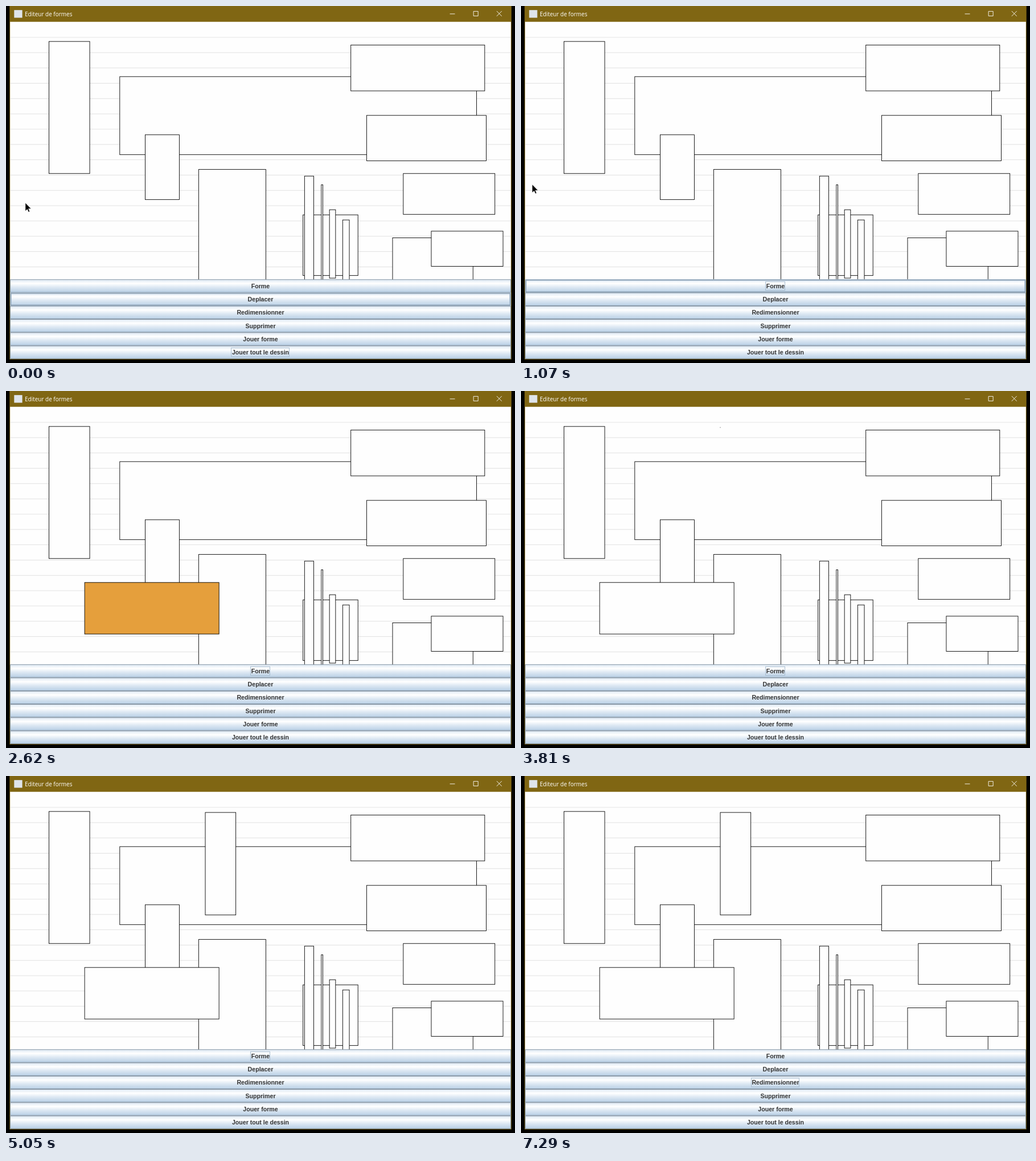
Write an HTML page that moves like this. It is 894 px wide and 626 px high and loops after 7990 ms.

```html
<!DOCTYPE html>
<html lang="fr">
<head>
<meta charset="utf-8">
<title>Editeur de formes</title>
<style>
  html, body { margin: 0; width: 100%; height: 100%; overflow: hidden; background: #000; }
  svg { display: block; }
  .shape { fill: #fefefe; stroke: #000; }
  .label { font: bold 11.88px "Liberation Sans", Arial, sans-serif; fill: #333; text-anchor: middle; }
  .title { font: 11.15px "Open Sans", "Noto Sans", sans-serif; fill: #fff; }
  .hidden { visibility: hidden; }
  .edge, .rollover rect, .ring { fill: none; }
  .edge, .rollover .mid { stroke: #7a8a99; }
  .rollover rect { stroke: #b8cfe5; }
  .ring { stroke: #a3b8cc; }
</style>
</head>
<body>
<!-- A 1000 x 700 window, shown slightly reduced -->
<svg width="894" height="626" viewBox="0 0 1000 700" preserveAspectRatio="none">
  <defs>
    <linearGradient id="ocean" x2="0" y2="1">
      <stop offset="0" stop-color="#dde8f3"/>
      <stop offset=".3" stop-color="#fff"/>
      <stop offset=".6" stop-color="#dde8f3"/>
      <stop offset="1" stop-color="#b8cfe5"/>
    </linearGradient>
  </defs>
  <rect width="1000" height="700"/>
  <rect x="7" width="986" height="693" fill="#806613"/>
  <rect x="8" y="31" width="984" height="661" fill="#fefefe"/>
  <rect x="16" y="8" width="16" height="15" fill="#dfe4ea"/>
  <text class="title" x="37" y="19.7">Editeur de formes</text>
  <path d="M872 15.5h10M918.5 10.5h9v9h-9zM964 10l10 10m0-10l-10 10" fill="none" stroke="#fff"/>
  <g id="lines" fill="#dfdfdf"></g>
  <g id="shapes"></g>
  <g id="buttons"></g>
  <path id="cursor" d="M0 0V16L3.8 12.6L6.2 18L8.6 17L6.3 11.6H11.3Z" stroke="#fff" stroke-width=".6"/>
</svg>
<script>
const LOOP = 7990, STEP = 92;
const LEFT = 8, TOP = 31, WIDTH = 984;
const ROWS_TOP = 536, ROW_H = 26;
const byId = id => document.getElementById(id);
const cursor = byId('cursor');

function set(el, attrs) {
  for (const key in attrs) el.setAttribute(key, attrs[key]);
  return el;
}
function add(parent, tag, attrs, text = '') {
  const el = set(document.createElementNS('http://www.w3.org/2000/svg', tag), attrs);
  el.textContent = text;
  return parent.appendChild(el);
}
const show = (el, on) => el.classList.toggle('hidden', !on);
const within = (t, from, to) => t >= from && t < to;

// One-pixel outline between two corner pixels
const outline = (x1, y1, x2, y2) => ({
  x: Math.min(x1, x2) + .5,
  y: Math.min(y1, y2) + .5,
  width: Math.max(Math.abs(x2 - x1), .01),
  height: Math.max(Math.abs(y2 - y1), .01)
});
const addShape = (...corners) =>
  add(byId('shapes'), 'rect', { class: 'shape', ...outline(...corners) });

for (let y = TOP + 30; y < ROWS_TOP; y += 30)
  add(byId('lines'), 'rect', { x: LEFT, y, width: WIDTH, height: 1 });

// The drawing: opposite corners, bottom layer first
[
  [84, 69, 164, 328], [223, 138, 924, 291], [677, 76, 940, 166],
  [708, 214, 943, 303], [273, 252, 340, 379], [378, 320, 510, 560],
  [583, 409, 691, 528], [586, 333, 604, 560], [619, 350, 622, 560],
  [635, 399, 647, 533], [661, 419, 674, 560], [780, 328, 960, 408],
  [759, 454, 917, 560], [835, 441, 976, 510]
].forEach(corners => addShape(...corners));

function addButton(name, i) {
  const top = ROWS_TOP + i * ROW_H;
  const g = add(byId('buttons'), 'g', {});
  const inset = (parent, n, cls) => add(parent, 'rect', {
    class: cls, ...outline(LEFT + n, top + n, LEFT + WIDTH - 1 - n, top + ROW_H - 1 - n)
  });
  const face = inset(g, 0, 'edge');
  const rollover = add(g, 'g', { class: 'rollover' });
  inset(rollover, 0, '');
  inset(rollover, 2, '');
  inset(rollover, 1, 'mid');
  const text = add(g, 'text', { class: 'label', x: 500, y: top + 17.5 }, name);
  const half = Math.round(text.getComputedTextLength() / 2) + 1;
  const ring = add(g, 'rect', { class: 'ring', ...outline(499 - half, top + 4, 499 + half, top + 21) });
  return { face, rollover, ring };
}
const buttons = ['Forme', 'Deplacer', 'Redimensionner', 'Supprimer', 'Jouer forme', 'Jouer tout le dessin']
  .map(addButton);

// A move: start time, number of steps, then start, bend and end of its curve
const move = (at, steps, ...points) => ({ at, steps, points });

// Latest position on a list of moves; a higher power brakes harder
function follow(moves, t, power) {
  const m = moves.filter(m => m.at <= t).pop();
  if (!m) return null;
  const p = Math.min(1, Math.floor((t - m.at) / STEP) / m.steps);
  const u = 1 - (1 - p) ** power, v = 1 - u;
  const [a, b, c] = m.points;
  return [0, 1].map(k => a[k] * v * v + 2 * b[k] * u * v + c[k] * u * u);
}

const pointer = [
  move(200, 4, [38, 386], [33, 360], [22, 350]),
  move(5940, 7, [4, 326], [35, 400], [38, 421]),
  move(7120, 1, [38, 421], [25, 240], [10, 62])
];
const drafts = [
  { origin: [154, 375], done: 2810, moves: [
    move(1750, 8, [154, 375], [195, 520], [404, 481]),
    move(2528, 1, [404, 481], [411, 478], [418, 476])
  ] },
  { origin: [391, 71], done: 5050, moves: [
    move(3810, 8, [391, 71], [321, 150], [447, 234]),
    move(4770, 2, [447, 234], [450, 255], [451, 272])
  ] }
];
for (const d of drafts) d.el = addShape(...d.origin, ...d.origin);

function render(t) {
  const visible = t < 1160 || within(t, 5940, 7290);
  const [px, py] = follow(pointer, Math.max(t, 200), 1);
  show(cursor, visible);
  set(cursor, { transform: `translate(${px} ${py})` });

  // The pointer is shown above the row it really acts on
  const hover = visible ? Math.floor((py - 338) / 32) : -1;
  const pressed = within(t, 870, 1070) ? 0 : within(t, 6910, 7120) ? 2 : -1;
  const focus = t < 870 ? 5 : t < 6910 ? 0 : 2;
  buttons.forEach((b, i) => {
    b.face.style.fill = i === pressed ? '#b8cfe5' : 'url(#ocean)';
    show(b.rollover, i === hover && i !== pressed);
    show(b.ring, i === focus);
  });

  for (const d of drafts) {
    const corner = follow(d.moves, t, 3);
    show(d.el, corner);
    if (corner) set(d.el, outline(...d.origin, ...corner.map(Math.round)));
    d.el.style.fill = t < d.done ? '#e59f3c' : '#fefefe';
  }
}

const start = performance.now();
function tick() {
  render((performance.now() - start) % LOOP);
  requestAnimationFrame(tick);
}
tick();
</script>
</body>
</html>
```
